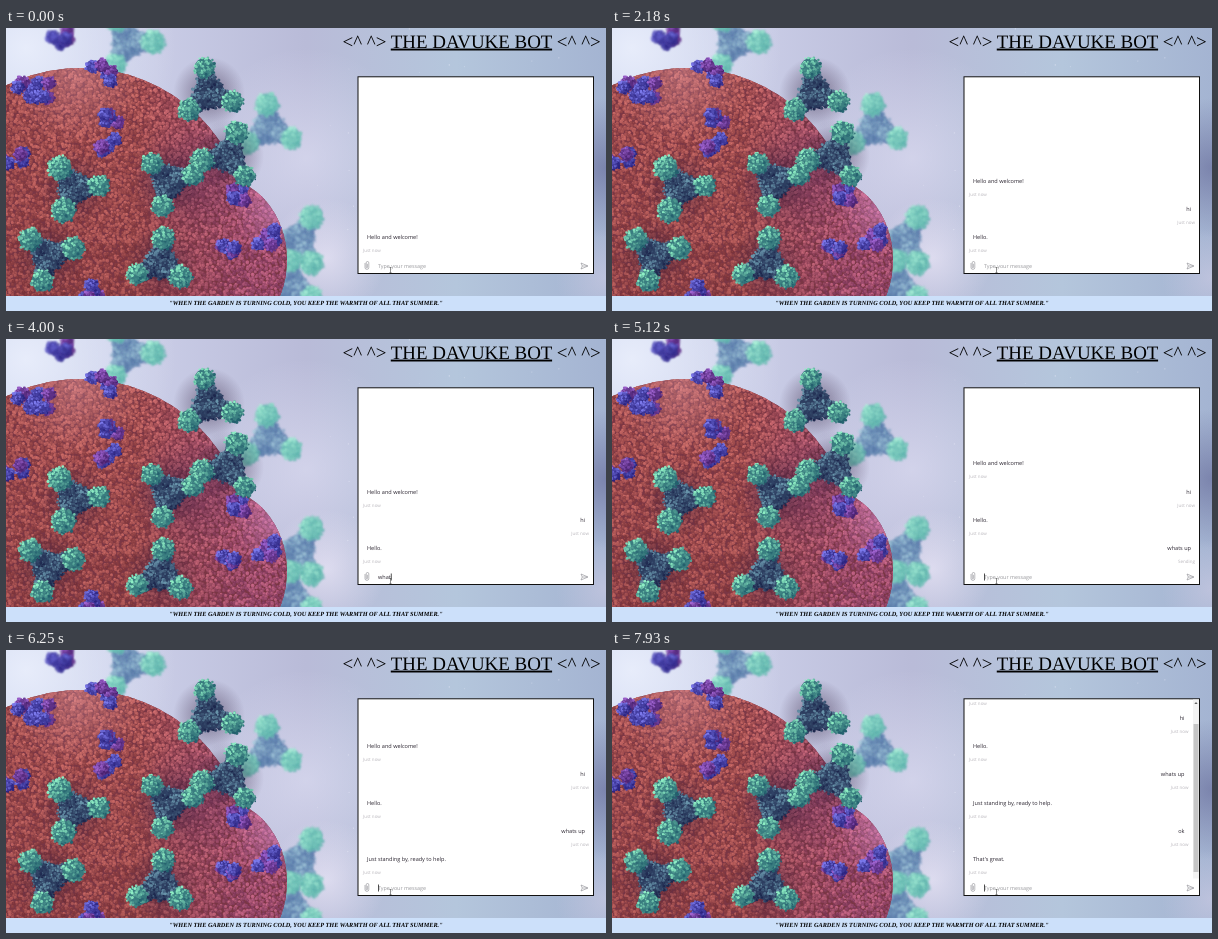
An HTML page with a canvas for the animation above (8000 ms loop, 600 px wide and 283 px high).

```html
<!DOCTYPE html>
<html lang="en">
<head>
<meta charset="utf-8">
<title>Chat bot</title>
<style>
html, body { margin: 0; width: 100%; height: 100%; overflow: hidden; }
canvas, svg { position: absolute; left: 0; top: 0; width: 600px; height: 283px; }
text { text-rendering: geometricPrecision; }
.title { font: 18.95px "Liberation Serif", serif; }
.title .name { text-decoration: underline; }
.quote { font: italic bold 6.27px "Liberation Serif", serif; text-anchor: middle; }
.msg, #input { font: 5.55px "Open Sans", sans-serif; fill: #2b2530; }
.stamp { font: 4.5px "Open Sans", sans-serif; fill: #b9b6bc; }
.right { text-anchor: end; }
#input.hint { font-size: 5.35px; fill: #98989c; }
.icon { fill: none; stroke: #8a8a90; stroke-width: .6; }
</style>
</head>
<body>
<canvas id="scene" width="600" height="283"></canvas>
<svg viewBox="0 0 600 283">
  <text class="title" x="336.5" y="19.6" xml:space="preserve">&lt;^ ^&gt; <tspan class="name">THE DAVUKE BOT</tspan> &lt;^ ^&gt;</text>
  <rect y="268" width="600" height="15" fill="#cce0fa"/>
  <text class="quote" x="300" y="277">"WHEN THE GARDEN IS TURNING COLD, YOU KEEP THE WARMTH OF ALL THAT SUMMER."</text>
  <rect x="352" y="48.8" width="235.500" height="196.700" fill="#fff" stroke="#111"/>
  <clipPath id="view"><rect x="352.500" y="49.300" width="234.500" height="180"/></clipPath>
  <g id="log" clip-path="url(#view)"></g>
  <g id="bar">
    <rect x="581" y="49.500" width="6" height="179" fill="#f3f3f3"/>
    <rect x="581.500" y="74" width="5" height="148" fill="#c5c5c5"/>
    <path d="M582.300 54 584 52 585.700 54z" fill="#666"/>
  </g>
  <text id="input" x="372" y="240"></text>
  <path id="caret" d="M0 234.500v7" stroke="#222" stroke-width=".8"/>
  <path class="icon" d="M359 235v4.500a1.900 1.900 0 0 0 3.800 0v-4.700a1.300 1.300 0 0 0-2.600 0v4.500a.6 .6 0 0 0 1.200 0v-3.500"/>
  <path class="icon" d="M575 235 582 238 575 241 576.300 238zM576.300 238h5"/>
  <path d="M383.500 239.500h2M384.500 239.500v5M383.500 244.500h2" stroke="#444" stroke-width=".6"/>
</svg>
<script>
const $ = id => document.getElementById(id);
const ctx = $('scene').getContext('2d');

let seed = 7;
const rnd = () => (seed = seed * 16807 % 2147483647) / 2147483647;
const jitter = size => (rnd() - .5) * size;
const clamp = v => Math.max(0, Math.min(1, v));
const blend = (a, b, k) => a.map((v, i) => Math.round(v + (b[i] - v) * k));
const mix = (a, b, k) => `rgb(${blend(a, b, k)})`;

function glow(x, y, r, rgb, alpha) {
  const g = ctx.createRadialGradient(x, y, 0, x, y, r);
  g.addColorStop(0, `rgba(${rgb},${alpha})`);
  g.addColorStop(1, `rgba(${rgb},0)`);
  ctx.fillStyle = g;
  ctx.fillRect(x - r, y - r, 2 * r, 2 * r);
}

function dot(x, y, r, fill) {
  ctx.fillStyle = fill;
  ctx.beginPath();
  ctx.arc(x, y, r, 0, 7);
  ctx.fill();
}

const GREEN = [[36, 96, 110], [142, 238, 196]];
const MINT = [[92, 176, 172], [176, 246, 220]];
const TEAL = [[30, 40, 78], [104, 148, 170]];
const HAZE = [[86, 118, 168], [168, 206, 222]];
const BLUE = [[44, 36, 128], [124, 122, 236]];
const VIOLET = [[74, 34, 112], [160, 100, 208]];

// A ball of small beads lit from the upper left
function cluster(x, y, r, [dark, light]) {
  const n = 14 + r * r * .45;
  dot(x, y, r * .9, mix(dark, light, .2));
  for (let i = 0; i < n; i++) {
    const d = r * Math.sqrt(1 - i / n), a = i * 2.4 + rnd();
    const dx = Math.cos(a) * d, dy = Math.sin(a) * d;
    const lit = .5 - (dx + dy) / (3 * r) + jitter(.7);
    dot(x + dx, y + dy, .8 + rnd() * .8, mix(dark, light, clamp(lit)));
  }
}

// A dark stem with three knobs, the first one pointing along the angle
function spike(x, y, deg, stem, knob) {
  cluster(x, y, 17, stem);
  for (let i = 0; i < 3; i++) {
    const a = (deg + i * 120) * Math.PI / 180;
    const at = d => [x + Math.cos(a) * d, y + Math.sin(a) * d];
    cluster(...at(14), 10, stem);
    cluster(...at(25 + jitter(3)), 12 + jitter(2), knob);
  }
}

function bud(x, y) {
  for (let i = 0; i < 5; i++)
    cluster(x + jitter(20), y + jitter(16), 7, i % 2 ? VIOLET : BLUE);
}

function backdrop() {
  const g = ctx.createLinearGradient(0, 0, 600, 0);
  ['#c3cdea', '#c9cce6', '#b9bbd8', '#b4c6dc', '#a4b4d2']
    .forEach((c, i) => g.addColorStop(i / 4, c));
  ctx.fillStyle = g;
  ctx.fillRect(0, 0, 600, 283);
  glow(20, 20, 150, '240,244,255', .8);
  glow(300, 130, 110, '226,226,246', .6);
  glow(320, 230, 60, '236,232,248', .7);
  glow(600, 140, 70, '96,100,148', .6);
  glow(600, 250, 50, '206,204,228', .6);
  for (let i = 0; i < 40; i++)
    dot(215 + rnd() * 385, rnd() * 268, .3 + rnd() * .4, 'rgba(245,245,255,.5)');
}

function globe() {
  const shape = new Path2D();
  shape.ellipse(75, 200, 165, 160, 0, 0, 7);
  shape.ellipse(212, 232, 69, 82, 0, 0, 7);
  ctx.save();
  ctx.clip(shape);
  ctx.fillStyle = '#7a3644';
  ctx.fillRect(0, 0, 300, 283);
  for (let y = 36; y < 270; y += 2.7)
    for (let x = 0; x < 284; x += 3.3) {
      const px = x + jitter(3), py = y + jitter(2.5);
      const pink = clamp((px - 130) / 110);
      const lit = clamp(.55 + jitter(.7) - (py - 150) / 900);
      const dark = blend([112, 44, 52], [116, 50, 84], pink);
      const light = blend([200, 104, 100], [208, 108, 140], pink);
      dot(px, py, 1.5 + rnd() * .5, mix(dark, light, lit));
      dot(px - .4, py - .6, .6, mix(dark, light, lit + .25));
    }
  glow(70, 45, 70, '226,160,176', .35);
  glow(272, 180, 45, '222,150,214', .5);
  glow(185, 150, 60, '70,30,80', .35);
  ctx.restore();
}

const farSpikes = [[122, 14, 0], [263, 100, -95], [292, 212, -60], [284, 256, -90]];
const nearSpikes = [
  [222, 128, -70], [203, 65, -100], [163, 153, -135],
  [68, 160, -125], [42, 228, -137], [155, 235, -85]
];
const buds = [
  [16, 61], [34, 62], [96, 45], [108, 94], [103, 117],
  [8, 128], [222, 218], [259, 209], [84, 264], [236, 166]
];

function drawScene() {
  backdrop();
  ctx.filter = 'blur(1.2px)';
  bud(52, 8);
  farSpikes.forEach(s => spike(...s, HAZE, MINT));
  ctx.filter = 'none';
  globe();
  buds.forEach(b => bud(...b));
  for (const s of nearSpikes) {
    glow(s[0], s[1], 36, '40,20,50', .5);
    spike(...s, TEAL, GREEN);
  }
}

const LOOP = 8000, STEP = 28.25, BLINK = 1060;
const KEY = 150, PAUSE = 400, CONFIRM = 330, REPLY = 460;

// [typed, answer, sent at]
const turns = [
  ['hi', 'Hello.', 1130],
  ['whats up', 'Just standing by, ready to help.', 4900],
  ['ok', "That's great.", 7440]
];

const messages = [{ at: 0, text: 'Hello and welcome!' }];
const typing = [{ at: -BLINK * .75, text: '' }];
for (const [text, answer, at] of turns) {
  messages.push({ at, text, mine: true }, { at: at + REPLY, text: answer });
  for (let n = 1; n <= text.length; n++)
    typing.push({ at: at - PAUSE - (text.length - n) * KEY, text: text.slice(0, n) });
  typing.push({ at, text: '' });
}

const line = (cls, x, y, s) => `<text class="${cls}" x="${x}" y="${y}">${s}</text>`;

function logMarkup(t) {
  const shown = messages.filter(m => m.at <= t);
  const full = shown.length > 6;
  const shift = full ? 6.5 : 0;
  $('bar').style.display = full ? '' : 'none';
  return shown.map(({ at, text, mine }, i) => {
    const y = 211 - (shown.length - 1 - i) * STEP;
    const side = mine ? ' right' : '';
    const note = mine && t < at + CONFIRM ? 'Sending' : 'Just now';
    return line('msg' + side, mine ? 579 - shift : 361, y, text) +
      line('stamp' + side, mine ? 583 - shift : 357, y + 13, note);
  }).join('');
}

let last = '';
function frame() {
  const t = performance.now() % LOOP;
  const html = logMarkup(t);
  if (html !== last) $('log').innerHTML = last = html;

  const { at, text } = typing.filter(k => k.at <= t).pop();
  const input = $('input');
  input.textContent = text || 'Type your message';
  input.setAttribute('class', text ? '' : 'hint');
  const x = 372.5 + (text ? input.getComputedTextLength() : 0);
  $('caret').setAttribute('transform', `translate(${x})`);
  $('caret').style.opacity = (t - at) % BLINK < BLINK / 2 ? 1 : 0;
  requestAnimationFrame(frame);
}

drawScene();
frame();
</script>
</body>
</html>
```
